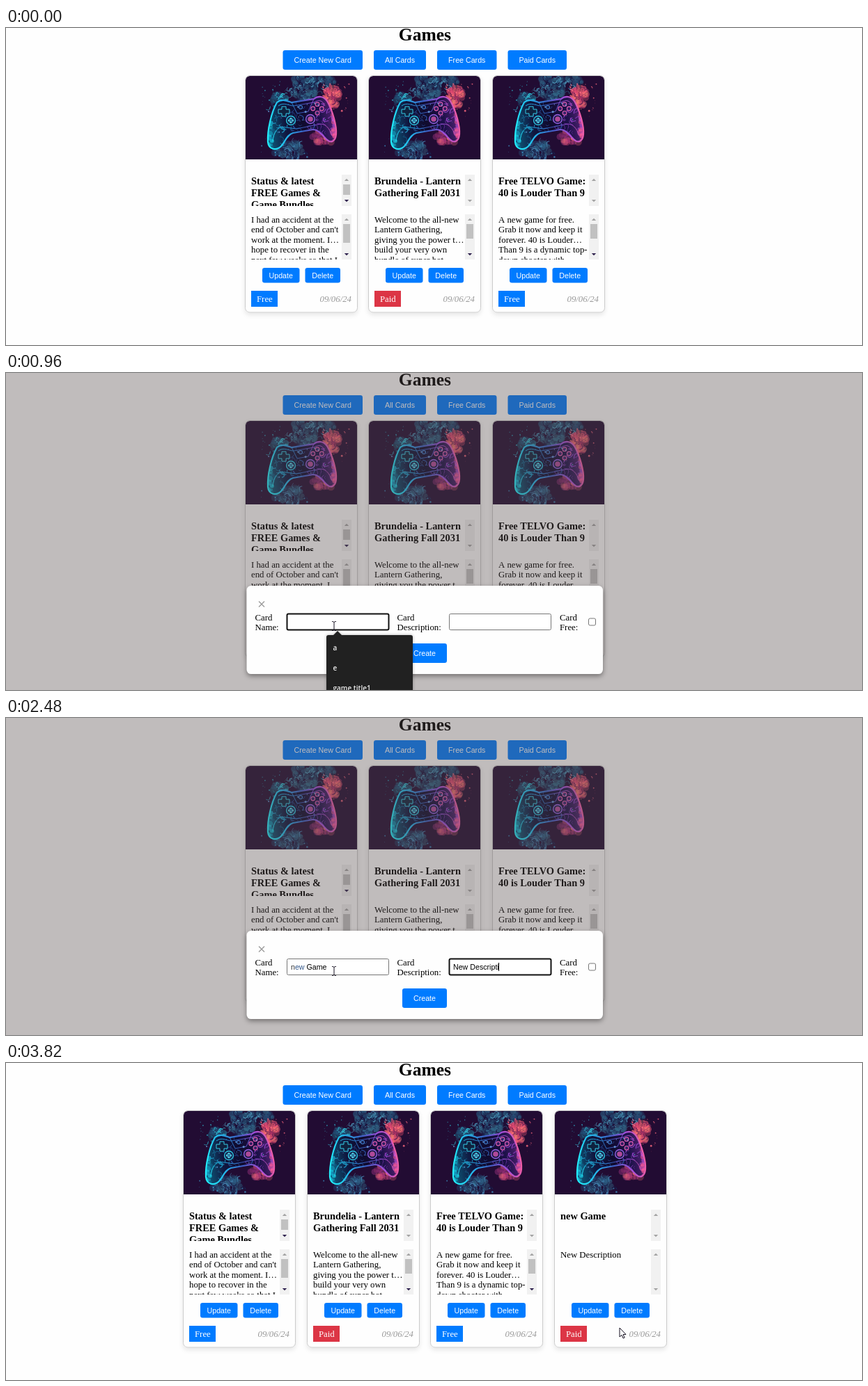
Write an HTML page with a canvas that moves like this. It is 1229 by 456 pixels and loops after 3860 ms.

```html
<!DOCTYPE html>
<html lang="en">
<head>
<meta charset="utf-8">
<title>Games</title>
<style>
html, body { margin: 0; width: 100%; height: 100%; overflow: hidden; background: #fefefe; }
canvas { display: block; }
</style>
</head>
<body>
<canvas id="stage" width="1229" height="456"></canvas>
<script>
const LOOP = 3860;
const OPEN = 440, CLOSE = 3120;
const BLUE = '#007bff', HOVER = '#0056b3', RED = '#dc3545';
const SERIF = '"Liberation Serif", "Times New Roman", serif';
const SANS = '"Liberation Sans", Arial, sans-serif';
const BODY = `12.8px ${SERIF}`, UI = `10.67px ${SANS}`;
const ctx = document.getElementById('stage').getContext('2d');

const CARDS = [
  { title: ['Status & latest', 'FREE Games &', 'Game Bundles'],
    text: ['I had an accident at the', "end of October and can't", 'work at the moment. I…', 'hope to recover in the', 'next few weeks so that I'],
    free: true, titleThumb: 15, textThumb: 27 },
  { title: ['Brundelia - Lantern', 'Gathering Fall 2031'],
    text: ['Welcome to the all-new', 'Lantern Gathering,', 'giving you the power t…', 'build your very own', 'bundle of super hot'],
    free: false, textThumb: 21 },
  { title: ['Free TELVO Game:', '40 is Louder Than 9'],
    text: ['A new game for free.', 'Grab it now and keep it', 'forever. 40 is Louder…', 'Than 9 is a dynamic top-', 'down shooter with'],
    free: true, textThumb: 21 },
  { title: ['new Game'], text: ['New Description'], free: false }
];

function text(str, x, y, font, color = '#000', align = 'left') {
  ctx.font = font;
  ctx.fillStyle = color;
  ctx.textAlign = align;
  ctx.fillText(str, x, y);
}

function rect(x, y, w, h, color) {
  ctx.fillStyle = color;
  ctx.fillRect(x, y, w, h);
}

function round(c, x, y, w, h, r) {
  c.beginPath();
  c.roundRect(x, y, w, h, r);
}

function button(label, x, y, w, h, color = BLUE) {
  round(ctx, x, y, w, h, 3.2);
  ctx.fillStyle = color;
  ctx.fill();
  text(label, x + w / 2, y + h / 2 + 3.8, UI, '#fff', 'center');
}

function panel(x, y, w, h, shadow) {
  ctx.save();
  ctx.shadowColor = `rgba(0,0,0,${shadow})`;
  ctx.shadowBlur = 7;
  ctx.shadowOffsetY = 3;
  round(ctx, x, y, w, h, 6.4);
  ctx.fillStyle = '#fefefe';
  ctx.fill();
  ctx.restore();
}

// Neon gamepad picture, painted once.
function paintArt() {
  const cv = document.createElement('canvas');
  cv.width = 160;
  cv.height = 120;
  const c = cv.getContext('2d');
  let seed = 77;
  const rnd = () => (seed = seed * 16807 % 2147483647) / 2147483647;
  const dot = (x, y, r, color, alpha = 1) => {
    c.globalAlpha = alpha;
    c.fillStyle = color;
    c.beginPath();
    c.arc(x, y, r, 0, 7);
    c.fill();
    c.globalAlpha = 1;
  };
  const spread = (x, y, w, h, n, paint) => {
    for (let i = 0; i < n; i++) {
      const a = rnd() * 6.28, d = Math.sqrt(rnd());
      paint(x + Math.cos(a) * d * w, y + Math.sin(a) * d * h, i);
    }
  };
  const cloud = (x, y, w, h, n, colors) => spread(x, y, w, h, n, (px, py, i) =>
    dot(px, py, 1 + rnd() * 4.5, colors[i % colors.length], 0.25 + rnd() * 0.35));
  const wisps = (x, y, w, h, n, color) => spread(x, y, w, h, n, (px, py) => {
    const a = rnd() * 6.28, len = 3 + rnd() * 7;
    c.strokeStyle = color;
    c.lineWidth = 0.4 + rnd() * 0.9;
    c.beginPath();
    c.moveTo(px, py);
    c.quadraticCurveTo(px + Math.cos(a) * len, py + Math.sin(a) * len,
      px + Math.cos(a + 0.9) * len, py + Math.sin(a + 0.9) * len);
    c.stroke();
  });
  const spray = (x, y, w, h, n, color) => {
    for (let i = 0; i < n; i++) dot(x + (rnd() - 0.5) * w, y + (rnd() - 0.5) * h, 0.3 + rnd() * rnd() * 1.4, color, 0.8);
  };
  const ramp = (...colors) => {
    const g = c.createLinearGradient(32, 70, 131, 55);
    colors.forEach((k, i) => g.addColorStop(i / (colors.length - 1), k));
    return g;
  };

  c.fillStyle = '#220c33';
  c.fillRect(0, 0, 160, 120);
  const smoke = ['#2b5b82', '#34718f', '#1b2950', '#24456e'];
  cloud(83, 17, 19, 20, 85, smoke);
  cloud(110, 8, 18, 9, 40, smoke);
  wisps(90, 15, 30, 17, 40, '#4b92b4');
  wisps(88, 16, 28, 17, 35, '#191540');
  cloud(63, 107, 22, 13, 70, smoke);
  wisps(63, 107, 21, 12, 22, '#4784b2');
  wisps(63, 107, 21, 12, 18, '#1b1742');
  cloud(124, 29, 10, 17, 55, ['#ff5b78', '#d63f72', '#ff8473']);
  wisps(124, 29, 10, 17, 18, '#702456');
  cloud(112, 88, 17, 10, 45, ['#e84a80', '#ff6f7c', '#8b2c74']);
  cloud(48, 35, 12, 12, 18, ['#1b7894', '#245a83']);
  wisps(46, 36, 13, 14, 16, '#30c3d8');
  spray(48, 28, 50, 40, 40, '#2fb6cf');
  spray(130, 35, 38, 50, 40, '#ff6a80');
  spray(55, 100, 70, 34, 30, '#3c8fc0');

  const body = new Path2D('M45 38C52 32 60 36 66 38L98 33C104 28 112 29 117 36C125 50 131 72 130 84C129 95 122 97 116 91C109 84 104 77 97 77L68 82C60 84 57 94 51 101C44 108 33 106 32 95C31 78 37 52 45 38Z');
  c.fillStyle = ramp('#0d5575', '#10163f', '#100b2e', '#1c1149', '#5d2579');
  c.fill(body);
  c.save();
  c.clip(body);
  cloud(35, 90, 5, 22, 22, ['#19cfe6', '#1580ae']);
  cloud(128, 74, 4, 23, 20, ['#c358dc', '#ff5d9c']);
  wisps(52, 72, 17, 28, 24, '#1c8fbc');
  wisps(110, 62, 17, 26, 22, '#8a3fbf');
  wisps(80, 62, 24, 20, 24, '#2b4c9a');
  c.restore();
  c.strokeStyle = ramp('#22ecfa', '#24b4ea', '#3b62c8', '#a34fdc', '#ff609c');
  c.lineWidth = 2.2;
  c.stroke(body);
  c.lineWidth = 0.9;
  c.stroke(new Path2D('M47 43C55 37 62 43 69 43L98 38C106 33 111 36 114 43M39 94C41 76 49 72 58 74L73 76L103 70C114 66 121 76 124 86M66 38L74 54L90 51L98 33'));

  const cross = new Path2D('M52 44h6v4h5v6h-5v4h-6v-4h-5v-6h5Z');
  c.fillStyle = '#10223f';
  c.fill(cross);
  c.strokeStyle = '#35cbe4';
  c.lineWidth = 1;
  c.stroke(cross);
  const stick = (x, y, ring, core) => {
    dot(x, y, 8.2, '#120d30');
    dot(x, y, 7.2, ring);
    dot(x, y, 5.6, '#151a44');
    dot(x, y, 3.8, core);
  };
  stick(65, 64, '#28b8d6', '#2b7ea4');
  stick(93, 62, '#8c59d6', '#b04a99');
  for (const [dx, dy] of [[-3, 0], [3, 0], [0, -3], [0, 3]]) {
    dot(65 + dx, 64 + dy, 1.1, '#6ae6ee');
    dot(103 + dx * 2.1, 47 + dy * 2.1, 3.4, '#e25fb2');
    dot(103 + dx * 2.1, 47 + dy * 2.1, 2.3, '#351d62');
  }
  dot(79, 45, 3, '#4282d0');
  dot(79, 45, 2, '#171d4c');
  spray(80, 65, 95, 55, 30, '#6ca4e2');
  return cv;
}

const art = paintArt();

function arrow(x, y, dir, on) {
  ctx.fillStyle = on ? '#30234f' : '#a3a3a3';
  ctx.beginPath();
  ctx.moveTo(x - 3.2, y - dir * 1.6);
  ctx.lineTo(x + 3.2, y - dir * 1.6);
  ctx.lineTo(x, y + dir * 1.8);
  ctx.fill();
}

function scrollBox(lines, x, y, h, font, first, step, thumb) {
  ctx.save();
  ctx.beginPath();
  ctx.rect(x, y, 132, h);
  ctx.clip();
  lines.forEach((line, i) => text(line, x, first + i * step, font));
  ctx.restore();
  rect(x + 130, y, 14, h, '#f1f1f1');
  if (thumb) rect(x + 132, y + 14, 10, thumb, '#c1c1c1');
  arrow(x + 137, y + 7.5, -1, false);
  arrow(x + 137, y + h - 7.5, 1, !!thumb);
}

function drawCard(card, x) {
  panel(x, 68, 161.5, 341.5, 0.1);
  ctx.save();
  round(ctx, x + 1, 69, 160, 340, [6, 6, 0, 0]);
  ctx.clip();
  ctx.drawImage(art, x + 1, 69);
  ctx.restore();
  round(ctx, x + 0.5, 68.5, 161, 340.5, 6.4);
  ctx.strokeStyle = '#ccc';
  ctx.lineWidth = 1;
  ctx.stroke();

  scrollBox(card.title, x + 9, 211, 45, `bold 14.4px ${SERIF}`, 225, 17, card.titleThumb);
  scrollBox(card.text, x + 9, 268, 65, BODY, 280, 14.4, card.textThumb);
  button('Update', x + 25, 345, 53.5, 21.5);
  button('Delete', x + 86.5, 345, 50.5, 21.5);
  rect(x + 9, 378, 38, 23, card.free ? BLUE : RED);
  text(card.free ? 'Free' : 'Paid', x + 17, 394, BODY, '#fff');
  text('09/06/24', x + 153, 394, `italic ${BODY}`, '#999', 'right');
}

function drawPage(count, hover) {
  rect(0, 0, 1229, 456, '#fefefe');
  text('Games', 601.4, 18, `bold 25.6px ${SERIF}`, '#000', 'center');
  button('Create New Card', 397.5, 32, 114.5, 28, hover ? HOVER : BLUE);
  button('All Cards', 528, 32, 75, 28);
  button('Free Cards', 619, 32, 85.5, 28);
  button('Paid Cards', 720.5, 32, 84.5, 28);
  const left = 609.6 - count * 88.8;
  CARDS.slice(0, count).forEach((card, i) => drawCard(card, Math.floor(left + i * 177.6)));
}

function field(x, value, focus, caret, tint) {
  round(ctx, x + 0.5, 346.5, 146, 23, 2);
  ctx.fillStyle = '#fff';
  ctx.fill();
  ctx.strokeStyle = focus ? '#101010' : '#767676';
  ctx.lineWidth = focus ? 2 : 1;
  ctx.stroke();
  text(value, x + 6, 362, UI);
  const width = ctx.measureText(value).width;
  if (tint && value.length > 1) {
    const lead = ctx.measureText(value[0]).width;
    rect(x + 6, 353, ctx.measureText(value.slice(0, 3)).width, 11, '#fff');
    text(value[0], x + 6, 362, UI, '#333');
    text(value.slice(1, 3), x + 6 + lead, 362, UI, '#35598c');
  }
  if (caret) rect(Math.floor(x + 6 + width), 352, 1, 12, '#000');
}

function label(x, word) {
  text('Card', x, 355.5, BODY);
  text(word, x, 370, BODY);
}

function dropdown() {
  ctx.save();
  ctx.shadowColor = 'rgba(0,0,0,.3)';
  ctx.shadowBlur = 4;
  round(ctx, 460, 377, 124, 100, 3);
  ctx.moveTo(469, 378);
  ctx.lineTo(476, 371);
  ctx.lineTo(483, 378);
  ctx.fillStyle = '#212121';
  ctx.fill();
  ctx.restore();
  ['a', 'e', 'game title1'].forEach((item, i) =>
    text(item, 469.5, 398.5 + i * 29, '600 10px "Open Sans", sans-serif', '#eee'));
}

function typed(str, t, start, step) {
  return t < start ? '' : str.slice(0, Math.floor((t - start) / step) + 1);
}

function drawModal(t, hover) {
  rect(0, 0, 1229, 456, 'rgba(85,75,75,.37)');
  panel(345.5, 306, 511.5, 127, 0.4);
  ctx.strokeStyle = '#999';
  ctx.lineWidth = 1.3;
  ctx.stroke(new Path2D('M363 328.5l8 8m0-8l-8 8'));

  const nameFocus = t >= 680 && t < 1440, descFocus = t >= 1440 && t < 3080;
  const desc = typed('New Desc', t, 1800, 57) + typed('ription', t, 2280, 46);
  label(357.5, 'Name:');
  field(403, typed('new Game', t, 1000, 57), nameFocus, nameFocus && (t < 960 || t >= 1000), true);
  label(561.5, 'Description:');
  field(636, desc, descFocus, descFocus && (t < 1720 || t >= 1800) && t < 2840);
  label(795, 'Free:');
  round(ctx, 836.5, 353, 10, 10, 2);
  ctx.strokeStyle = '#767676';
  ctx.lineWidth = 1;
  ctx.stroke();
  button('Create', 569, 389, 64, 28, hover ? HOVER : BLUE);
  if (t >= 720 && t < 1000) dropdown();
}

const POINTERS = {
  arrow: new Path2D('M0 0V13L3 10.3L5.2 15L7.2 14L5 9.6L9 9.4Z'),
  hand: new Path2D('M-1.3 1C-1.3-.6 1.3-.6 1.3 1V6C2 5 4 5.2 4 6.4C5 5.7 6.3 6 6.3 7.2C7.4 6.7 8.3 7.3 8.3 8.5V12C8.3 14 7 15 7 18H-.5C-.5 16-2.4 14.5-4.4 10.6C-5.2 9-3.4 8-2.4 9.2L-1.3 10.6Z'),
  beam: new Path2D('M-3-6.5C-1-6.5 0-6 0-5C0-6 1-6.5 3-6.5M0-5V5M-3 6.5C-1 6.5 0 6 0 5C0 6 1 6.5 3 6.5')
};

function drawPointer(kind, x, y) {
  ctx.save();
  ctx.translate(x, y);
  ctx.fillStyle = '#fff';
  ctx.strokeStyle = '#151020';
  ctx.lineWidth = 1;
  if (kind !== 'beam') ctx.fill(POINTERS[kind]);
  ctx.stroke(POINTERS[kind]);
  ctx.restore();
}

// Start time, end time, then the point reached.
const MOVES = [[80, 400, 465, 40], [440, 640, 471, 364], [2920, 3040, 597, 411], [3580, 3820, 881, 381]];
const CLICKS = [400, 680, 3080];

function pointerAt(t) {
  let x = 880, y = 456;
  for (const [a, b, nx, ny] of MOVES) {
    const p = Math.min(1, Math.max(0, (t - a) / (b - a)));
    const e = p * p * (3 - 2 * p);
    x += (nx - x) * e;
    y += (ny - y) * e;
  }
  return [x, y];
}

const inside = (x, y, l, t, r, b) => x >= l && x <= r && y >= t && y <= b;

function draw(time) {
  const shift = time >= 3620 ? 20 : 0;
  const t = Math.floor((time - shift) / 40) * 40 + shift;
  const [x, y] = pointerAt(t);
  const open = t >= OPEN && t < CLOSE;
  const overNew = t < OPEN && inside(x, y, 397, 32, 512, 60);
  const overCreate = open && inside(x, y, 569, 389, 633, 417);
  const overField = open && (inside(x, y, 403, 346, 550, 370) || inside(x, y, 636, 346, 783, 370));

  drawPage(t < CLOSE ? 3 : 4, overNew);
  if (open) drawModal(t, overCreate);
  if (t < 120) return;
  if (CLICKS.includes(t)) {
    ctx.fillStyle = 'rgba(255,255,0,.5)';
    ctx.beginPath();
    ctx.arc(x, y, 9.5, 0, 7);
    ctx.fill();
  }
  drawPointer(overNew || overCreate ? 'hand' : overField ? 'beam' : 'arrow', x, y);
}

const start = performance.now();
function tick() {
  draw((performance.now() - start) % LOOP);
  requestAnimationFrame(tick);
}
tick();
</script>
</body>
</html>
```
